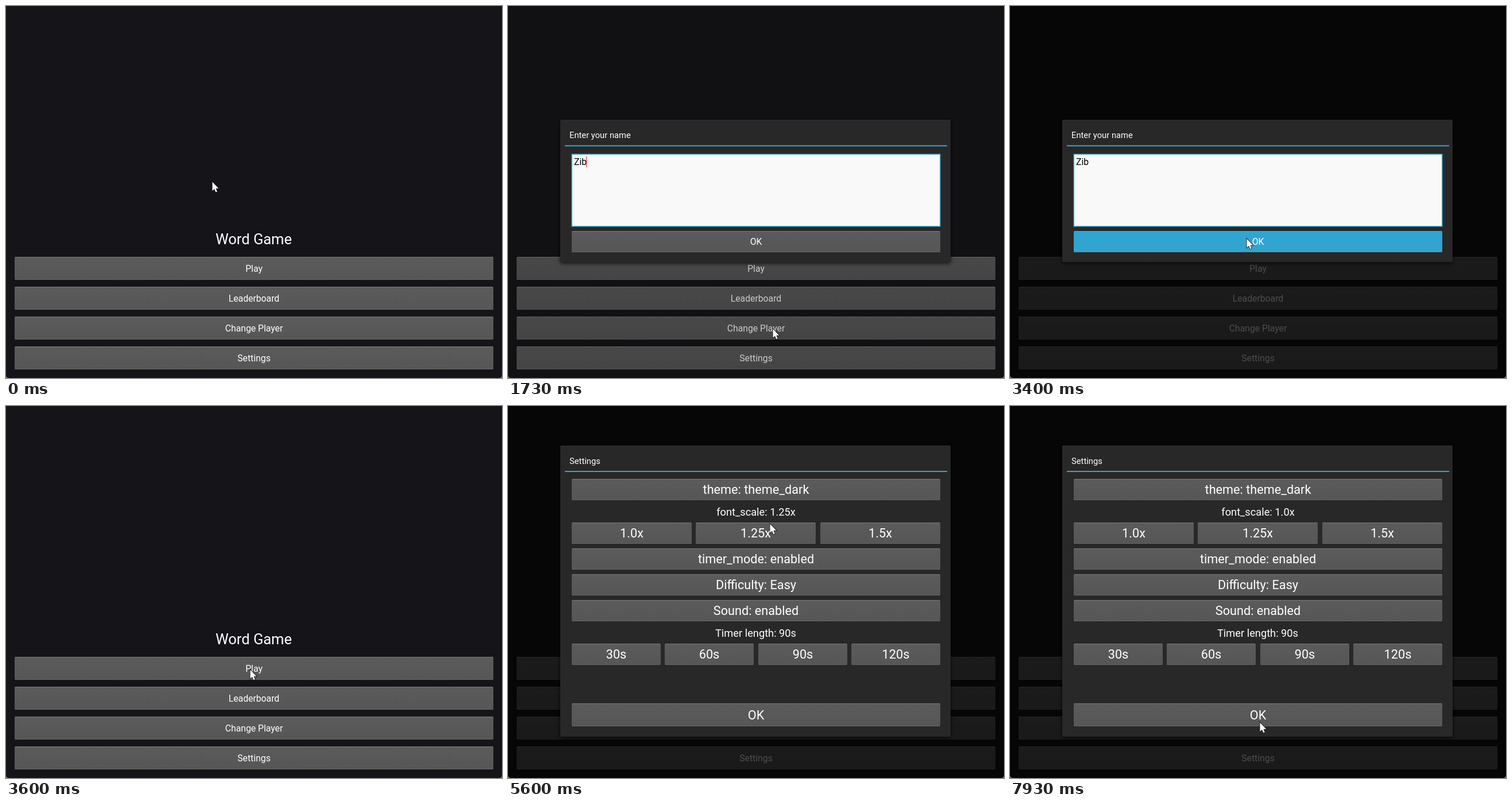
These frames come from a looping animation (864x648 px, 8 s). An HTML page with a canvas:

```html
<!DOCTYPE html>
<html lang="en">
<head>
<meta charset="utf-8">
<title>Word Game</title>
<style>
  html, body { margin: 0; width: 100%; height: 100%; overflow: hidden; background: #151519; }
  canvas { display: block; }
</style>
</head>
<body>
<canvas id="stage" width="864" height="648"></canvas>
<script>
const ctx = document.getElementById('stage').getContext('2d');
const LOOP = 8000, FPS = 15;
const BLUE = '#32a4d0';
const SMALL = 15.75, LARGE = 21.7, LABEL = 18.25;

const clamp = v => Math.max(0, Math.min(1, v));
const between = (t, from, to) => t >= from && t < to;
const linear = p => p;
const easeOut = p => p * (2 - p);
const easeInOut = p => p * p * (3 - 2 * p);

// Pointer stops: time, x, y, easing of the move that ends there
const pointerPath = [
  [0, 359, 306],
  [133, 359, 306],
  [1000, 459, 600, easeInOut],
  [1067, 460, 606],
  [1333, 460, 606],
  [1533, 461, 562],
  [1933, 461, 562],
  [2400, 440, 440, easeInOut],
  [2800, 440, 440],
  [3333, 412, 405, easeInOut],
  [3467, 412, 405],
  [3533, 416, 424],
  [3600, 425, 459],
  [3667, 431, 526],
  [4133, 443, 606, easeOut],
  [4933, 443, 606],
  [5400, 456, 171, easeInOut],
  [5533, 456, 171],
  [5600, 456, 205],
  [5867, 320, 228],
  [6133, 256, 221, easeOut],
  [7400, 256, 221],
  [7933, 435, 551, easeInOut],
  [LOOP, 435, 551]
];

function pointerAt(t) {
  const i = Math.max(1, pointerPath.findIndex(stop => stop[0] >= t));
  const [t0, x0, y0] = pointerPath[i - 1];
  const [t1, x1, y1, ease = linear] = pointerPath[i];
  const p = ease(clamp((t - t0) / (t1 - t0)));
  return [x0 + (x1 - x0) * p, y0 + (y1 - y0) * p];
}

function rect(x, y, w, h, color) {
  ctx.fillStyle = color;
  ctx.fillRect(x, y, w, h);
}

function text(str, x, baseline, size, align = 'center', color = '#fff') {
  ctx.font = `${size}px Roboto, sans-serif`;
  ctx.textAlign = align;
  ctx.fillStyle = color;
  ctx.fillText(str, x, baseline);
}

function button(label, x, y, w, h, size, pressed) {
  const fill = ctx.createLinearGradient(0, y, 0, y + h);
  fill.addColorStop(0, pressed ? BLUE : '#5b5b5b');
  fill.addColorStop(1, pressed ? BLUE : '#565656');
  ctx.fillStyle = fill;
  ctx.beginPath();
  ctx.roundRect(x, y, w, h, 1.5);
  ctx.fill();
  rect(x + 1, y, w - 2, 1, pressed ? '#47b0d8' : '#7c7c7c');
  rect(x + 1, y + h - 1, w - 2, 1, pressed ? '#2d97c0' : '#666');
  text(label, x + w / 2, y + h / 2 + size * 0.365, size);
}

function buttonRow(labels, y, pressedIndex = -1) {
  const gap = 7.4, w = (642 - gap * (labels.length - 1)) / labels.length;
  labels.forEach((label, i) =>
    button(label, Math.round(111 + i * (w + gap)), y, Math.round(w), 37, LARGE, i === pressedIndex));
}

function drawMenu(t) {
  rect(0, 0, 864, 648, '#151519');
  text('Word Game', 431.5, 415, 25.5);
  const pressed = between(t, 1590, 1710) ? 2 : between(t, 4260, 4340) ? 3 : -1;
  ['Play', 'Leaderboard', 'Change Player', 'Settings'].forEach((label, i) =>
    button(label, 15, 437 + 52 * i, 834, 40, SMALL, i === pressed));
}

function drawPopup(title, y, h, alpha) {
  rect(0, 0, 864, 648, `rgba(0, 0, 0, ${0.7 * alpha})`);
  ctx.save();
  ctx.shadowColor = 'rgba(0, 0, 0, 0.8)';
  ctx.shadowBlur = 7;
  ctx.shadowOffsetY = 2;
  ctx.fillStyle = '#282828';
  ctx.beginPath();
  ctx.roundRect(91, y, 680, h, 2);
  ctx.fill();
  ctx.restore();
  rect(92, y, 678, 1, '#323232');
  text(title, 107, y + 31.5, 14.75, 'left');
  rect(99, y + 44, 666, 2, BLUE);
}

function drawNameDialog(t) {
  const alpha = t < 3000 ? clamp((t - 1705) / 95) : clamp((3554 - t) / 100);
  drawPopup('Enter your name', 198.5, 247.5, alpha);
  rect(110.5, 257.5, 643, 127, '#45afd3');
  rect(112, 259, 640, 124, '#f9f9f9');
  text('Zib', 115, 276.5, SMALL, 'left', '#000');
  if (t < 2060 || between(t, 2590, 3090)) rect(136, 262, 1.3, 19, '#f04848');
  button('OK', 111, 392, 642, 37, SMALL, between(t, 3390, 3460));
}

function drawSettings(t) {
  drawPopup('Settings', 69, 507, clamp((t - 4340) / 96));
  const scale = t < 6390 ? '1.25x' : '1.0x';
  buttonRow(['theme: theme_dark'], 127);
  text('font_scale: ' + scale, 432, 191, LABEL);
  buttonRow(['1.0x', '1.25x', '1.5x'], 203, between(t, 6325, 6390) ? 0 : -1);
  buttonRow(['timer_mode: enabled'], 248);
  buttonRow(['Difficulty: Easy'], 293);
  buttonRow(['Sound: enabled'], 338);
  text('Timer length: 90s', 431.5, 402, LABEL);
  buttonRow(['30s', '60s', '90s', '120s'], 414);
  button('OK', 111, 518, 642, 40, LARGE);
}

function drawCorner(x, inward, color) {
  ctx.fillStyle = color;
  ctx.beginPath();
  ctx.moveTo(x, 642);
  ctx.quadraticCurveTo(x, 648, x + 6 * inward, 648);
  ctx.lineTo(x, 648);
  ctx.fill();
}

function drawPointer(x, y) {
  ctx.save();
  ctx.translate(x, y);
  ctx.beginPath();
  [[0.5, 0.5], [0.5, 16], [4, 12.8], [6.3, 18.3], [8.8, 17.2], [6.5, 11.8], [11.3, 11.8]]
    .forEach(([px, py]) => ctx.lineTo(px, py));
  ctx.closePath();
  ctx.lineWidth = 1.6;
  ctx.strokeStyle = '#111';
  ctx.stroke();
  ctx.fillStyle = '#fff';
  ctx.fill();
  ctx.restore();
}

function draw(now) {
  // The screen refreshes in steps of 1/15 s
  const t = Math.floor((now % LOOP + 5) * FPS / 1000) * 1000 / FPS;
  drawMenu(t);
  if (between(t, 1710, 3554)) drawNameDialog(t);
  if (t >= 4340) drawSettings(t);
  drawCorner(0, 1, '#77745f');
  drawCorner(864, -1, '#6c6c70');
  drawPointer(...pointerAt(t));
}

const start = performance.now();
function tick() {
  draw(performance.now() - start);
  requestAnimationFrame(tick);
}
tick();
</script>
</body>
</html>
```
